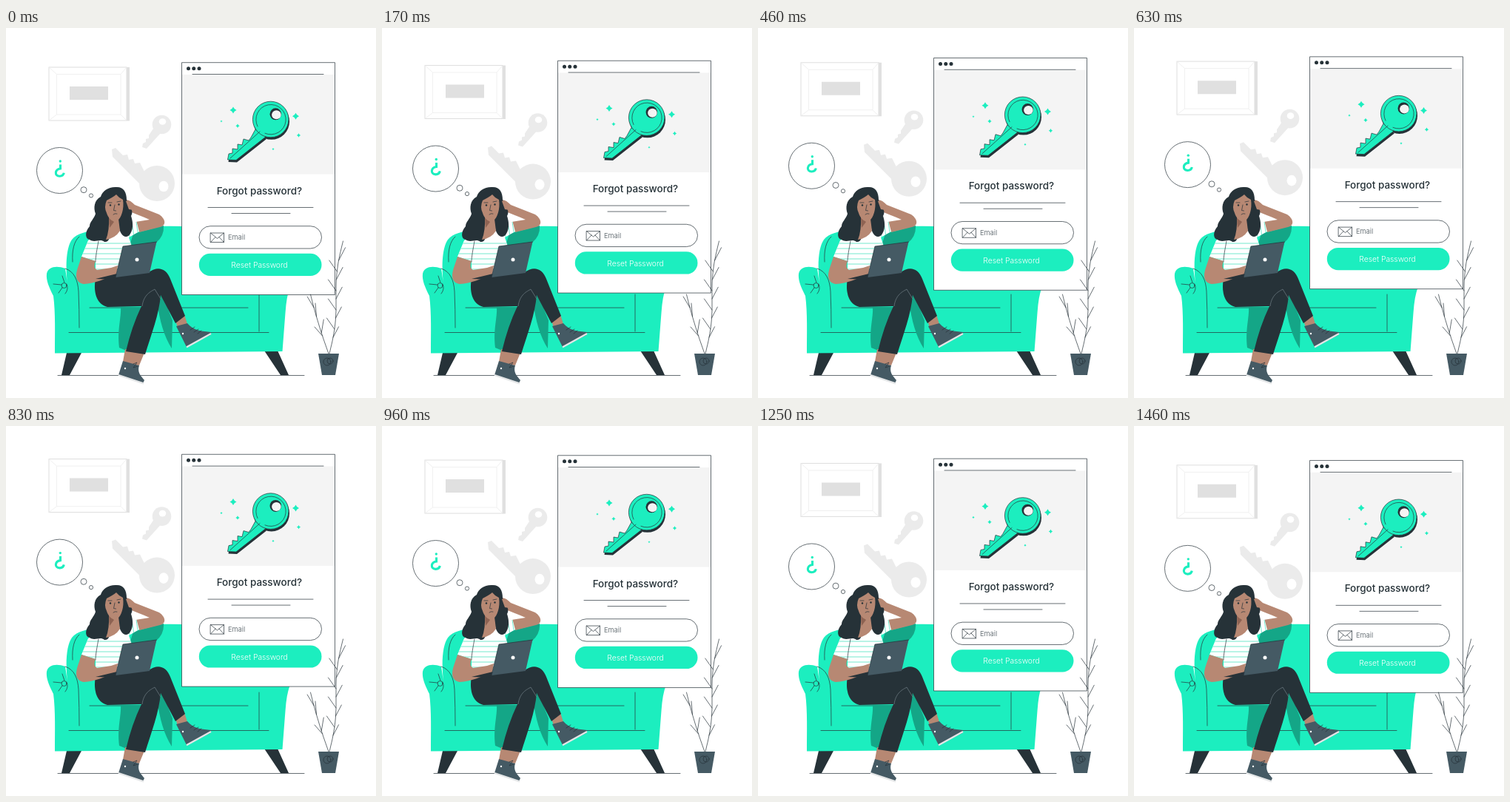
Write an HTML page that moves like this. It is 500 px wide and 500 px high and loops after 1500 ms.

```html
<!DOCTYPE html>
<html lang="en">
<head>
<meta charset="utf-8">
<title>Forgot password</title>
<style>
  html, body { margin: 0; width: 100%; height: 100%; overflow: hidden; background: #fff; }
  svg { display: block; width: 100vw; height: 100vh; }
  text { font-family: Inter, "Open Sans", sans-serif; }
  .g { fill: #1ceebf; }
  .t { fill: #14a687; }
  .d { fill: #263238; }
  .s { fill: #455a64; }
  .k { fill: #b78873; }
  .w { fill: #fff; }
  .e { fill: #ebebeb; }
  .l { fill: none; stroke: #263238; stroke-width: .7; stroke-linecap: round; stroke-linejoin: round; }
  .o { stroke: #263238; stroke-width: .7; stroke-linejoin: round; }
</style>
</head>
<body>
<svg viewBox="0 0 500 500" xmlns="http://www.w3.org/2000/svg">
  <defs>
    <path id="shirt" d="M111 287C117 283 129 281 137 280L157 268L176 260L180 275L166 283L170 295H158L150 333L121 337V315L102 309Z"/>
    <clipPath id="cut"><use href="#shirt"/></clipPath>
    <path id="shaft" d="M337 137L331 148L328 152L321 150L319 158L313 157V164L306 163V169L301 170L299.500 178L311 178.500L351 147Z"/>
    <circle id="bow" cx="357.700" cy="123.500" r="24.300"/>
  </defs>

  <g class="float">
    <!-- wall picture -->
    <path fill="#e0e0e0" d="M163 53h4v72.500h-4z"/>
    <rect x="58" y="53" width="105" height="72" fill="#fff" stroke="#dedede"/>
    <path d="M68.500 62.500H155V117H68.500zM58 53l10.500 9.500M163 53l-8 9.500M58 125l10.500-8M163 125l-8-8" fill="none" stroke="#ededed" stroke-width=".8"/>
    <path fill="#e0e0e0" d="M86 79h52v18H86z"/>
    <!-- loose keys -->
    <path class="e" d="M199 136L193 145V149L189 150V154L185 156L184 161L190 163L209 142Z"/>
    <circle class="e" cx="210.500" cy="130.500" r="12.800"/>
    <ellipse class="w" cx="211.500" cy="126.500" rx="4.800" ry="4.300"/>
    <path class="e" d="M187 194L181 182L174 183L172 177L166 178L164 171L158 172L148 162L143 164L144 174L183 213Z"/>
    <circle class="e" cx="204" cy="210" r="24"/>
    <ellipse class="w" cx="213" cy="214" rx="6.500" ry="7.300"/>
    <!-- thought -->
    <circle class="w o" cx="72.500" cy="192.500" r="31"/>
    <circle class="g" cx="73.300" cy="180" r="1.700"/>
    <path d="M73.500 184.500V190C66 191 65 200 72.500 200.300Q77.500 200 78.300 195.800" fill="none" stroke="#1ceebf" stroke-width="3.100"/>
    <circle class="w o" cx="105" cy="218.700" r="4"/>
    <circle class="w o" cx="115" cy="226.500" r="2.600"/>
  </g>

  <!-- sofa -->
  <path class="l" d="M70 469.500H403"/>
  <path class="d" d="M82 439H102L86 469H75ZM349 436H367L382 469H371Z"/>
  <path class="g" d="M83 345C80 318 82 296 89 286C96 277 109 275 125 273Q175 267 240 268H335C352 269 356 282 356 300V330L384 350Q379 362 377.500 385L373.500 437L66 439.500C66 412 67 385 64 362C58 350 54 341 55 332C57 322 69 321 80 325Z"/>
  <path class="l" d="M80 325C92 329 97 340 98 356Q99 380 99 405M90 316C89 300 92 288 99 282M85 411.500H355M113 378H327M342 360V410"/>
  <circle class="l" cx="78.500" cy="348" r="3.500"/>
  <path class="l" d="M79 344L76 335M75 347L64 346M76 351L71 358M82 346Q85 353 80 359"/>
  <path class="t" d="M172 278L213 267Q214 281 203 290L165 300ZM155 377H185L165 437L153 432C150 407 156 392 155 377ZM204 368L211 360L225 395L224 433Q209 410 204 368Z"/>

  <!-- person -->
  <path class="k" d="M161 434L187 439L180 456L158 451ZM229 395L241 387L245 400L232 405Z"/>
  <path class="d" d="M121 339L193 330C205 321 217 325 222 339L242 389L229 399L209 361C207 387 196 415 188 441L162 437Q170 403 183 376L137 377C121 373 118 354 121 339Z"/>
  <path d="M184 376C186 360 196 356 201 353L209 366" fill="none" stroke="#718087" stroke-width=".7"/>
  <path class="s" d="M158 450L180 456C177 465 182 470 187 476L185 480L152 469ZM230 403L245 399C253 409 266 410 277 411L276 415L244 431Z"/>
  <path d="M152 469L186 480.300M244 431.300L277 413" stroke="#e4e6e7" stroke-width="2.300"/>
  <path class="l" d="M172 454L177 452L172 459L178 457M249 408L255 404M254 411L260 407M259 413L264 409"/>
  <circle class="w" cx="161" cy="460" r="1.200"/>
  <circle class="w" cx="239" cy="413" r="1.200"/>

  <path class="k" d="M157 234C163 230 168 233 174 239L207 252C216 258 217 267 208 269L180 276L175 262L194 259C183 254 173 251 164 246Z"/>
  <use href="#shirt" class="w"/>
  <g id="stripes" clip-path="url(#cut)" stroke="#62e6c8" stroke-width=".9"></g>
  <path class="l" d="M125 288C123 299 121 309 121 316"/>

  <path class="d" d="M150 215C139 214 130 220 128 228C119 233 118 243 121 251C119 258 113 262 113 268C106 276 107 285 113 286C120 291 127 284 133 289C139 290 141 283 141 275L152 265C154 284 164 285 168 278C173 270 171 260 169 254C174 246 165 240 163 232C163 222 159 215 150 215Z"/>
  <path class="k" d="M139 254L152 258L154 274Q148 284 135 286Q140 274 139 254Z"/>
  <path fill="#8e6353" d="M139 256L146 262L140 270Z"/>
  <path class="k" d="M136 233C141 230 146 228 149 225Q153 230 158 232C160 244 156 257 150 261C144 263 138 257 136 250Q132 242 136 233Z"/>
  <path class="k" d="M162 234C167 233 171 238 175 241L184 248L166 245Z"/>
  <circle class="d" cx="141" cy="239.500" r="1.200"/>
  <circle class="d" cx="152.500" cy="238.500" r="1.200"/>
  <path class="l" d="M138 236L143 236M150 235L155 234M147 239L145.500 246.500L148.500 247M145 252Q147 250 150 251"/>

  <path class="k" d="M102 309L121 315C119 320 119 325 123 327L142 324L151 321L149 334C137 337 119 346 105 346C93 344 94 333 97 324Z"/>
  <path class="d" d="M121 339L150 332L193 328L191 333L149 340Z"/>
  <path class="s" d="M158 295L203.500 289L194 331L148 337Z"/>
  <path class="l" d="M203.500 289L158 295L148 337"/>
  <circle class="w" cx="177" cy="313" r="2.500"/>

  <!-- window -->
  <g class="float">
    <rect class="w o" x="237.500" y="46.700" width="207" height="313.800"/>
    <path fill="#f4f4f4" d="M238 63h206v134.500h-206z"/>
    <path class="l" d="M252 62.500H429M273 242.500H415M305 250.500H384"/>
    <g id="dots" class="d"></g>
    <g id="sparks" class="g"></g>
    <g class="d" transform="translate(1 3)"><use href="#shaft"/><use href="#bow"/></g>
    <g class="o" stroke-width="1"><use href="#shaft" class="g"/><use href="#bow" class="g"/></g>
    <path class="l" d="M340 133A20.200 20.200 0 1 1 350 142.300M303 176L343 140"/>
    <ellipse class="d" cx="364.300" cy="116.300" rx="7.800" ry="8"/>
    <ellipse cx="365.400" cy="117.300" rx="6.300" ry="6" fill="#f4f4f4"/>
    <text class="d" x="342.400" y="224.500" font-size="13.500" font-weight="500" text-anchor="middle">Forgot password?</text>
    <rect class="w o" x="261" y="267.700" width="165.500" height="30.300" rx="15.100"/>
    <path class="l" d="M276.500 277H294.500V289.500H276.500ZM276.500 277L285.500 284.500L294.500 277M276.500 289.500L283 282.500M294.500 289.500L288 282.500"/>
    <text x="300" y="286.200" font-size="9.200" fill="#6b7479">Email</text>
    <rect class="g" x="260.800" y="304.800" width="165.700" height="30.200" rx="15.100"/>
    <text x="342.500" y="324" font-size="10.300" font-weight="300" fill="#fff" text-anchor="middle">Reset Password</text>
  </g>

  <!-- plant -->
  <g id="plant"></g>
  <path class="s" d="M422 440H450L445 469H427Z"/>
  <circle class="l" cx="434" cy="451" r="5"/>
  <circle class="l" cx="438" cy="450" r="4"/>
</svg>
<script>
const LOOP = 1500, STEPS = 36, RISE = 770, SETTLED = 1480, HEIGHT = 8.9;
const NS = "http://www.w3.org/2000/svg";
const $ = id => document.getElementById(id);

function add(id, tag, attrs) {
  const el = document.createElementNS(NS, tag);
  for (const name in attrs) el.setAttribute(name, attrs[name]);
  $(id).appendChild(el);
}

for (let i = 0; i < 3; i++) add("dots", "circle", { cx: 246.5 + 7.25 * i, cy: 54.7, r: 2.5 });

for (let y = 291; y < 335; y += 7) add("stripes", "path", { d: `M100 ${y}H172` });
for (let x = 164; x < 180; x += 6) add("stripes", "path", { d: `M${x} 262l3 20` });

// four-pointed star
function star(x, y, r) {
  const q = r * .72;
  add("sparks", "path", {
    d: `M${x} ${y - r}q${r - q} ${q} ${r} ${r}q${-q} ${r - q} ${-r} ${r}` +
       `q${q - r} ${-q} ${-r} ${-r}q${q} ${q - r} ${r} ${-r}`
  });
}
star(307, 111, 4.5);
star(391.5, 119.3, 4.5);
star(313, 132.3, 2.7);
star(395.5, 145, 2.7);
star(291, 126, 1.6);
star(361, 163.7, 1.6);

// stems: x as a function of height above the pot
const tall = h => 437 + .12 * h + 3 * Math.sin(h * Math.PI / 75);
const short = h => 436 - .37 * h + .0008 * h * h;

function stem(x, top) {
  let d = `M${x(0)} 440`;
  for (let h = 4; h <= top; h += 4) d += `L${x(h).toFixed(1)} ${440 - h}`;
  add("plant", "path", { class: "l", d });
}

// lens-shaped leaf growing from the stem by (dx, dy)
function leaf(cls, x, h, dx, dy) {
  const w = .3, base = `M${x(h)} ${440 - h}`;
  const side = s => `${dx / 2 - s * dy * w} ${dy / 2 + s * dx * w}`;
  const back = `${-dx / 2 - dy * w} ${-dy / 2 + dx * w}`;
  add("plant", "path", { class: cls, d: `${base}q${side(1)} ${dx} ${dy}q${back} ${-dx} ${-dy}` });
  add("plant", "path", { class: "l", d: `${base}l${dx * .75} ${dy * .75}` });
}

stem(tall, 152);
stem(short, 82);
for (let i = 0; i < 5; i++) {
  leaf("g", tall, 22 + 26 * i, 10 + i / 2, -19 - i);
  if (i) leaf("g", tall, 7 + 26 * i, -14, -20);
}
for (let i = 0; i < 2; i++) {
  leaf("t", short, 24 + 38 * i, -14 + 2 * i, -16 - 4 * i);
  leaf("t", short, 28 + 22 * i, 4 - 6 * i, -24);
}

// glides up with a soft stop, then sinks with a soft start and end
function lift(t) {
  if (t < RISE) {
    const u = t / RISE;
    return HEIGHT * (u + Math.sin(u * Math.PI / 2)) / 2;
  }
  const u = Math.max(0, (SETTLED - t) / (SETTLED - RISE));
  return HEIGHT * (u + u * u * (3 - 2 * u)) / 2;
}

const floats = document.querySelectorAll(".float");
function draw(ms) {
  const step = Math.floor((ms % LOOP) / LOOP * STEPS + .1) % STEPS;
  const y = -lift(step * LOOP / STEPS);
  floats.forEach(g => g.setAttribute("transform", `translate(0 ${y.toFixed(2)})`));
}

const start = performance.now();
function tick() {
  draw(performance.now() - start);
  requestAnimationFrame(tick);
}
tick();
</script>
</body>
</html>
```
